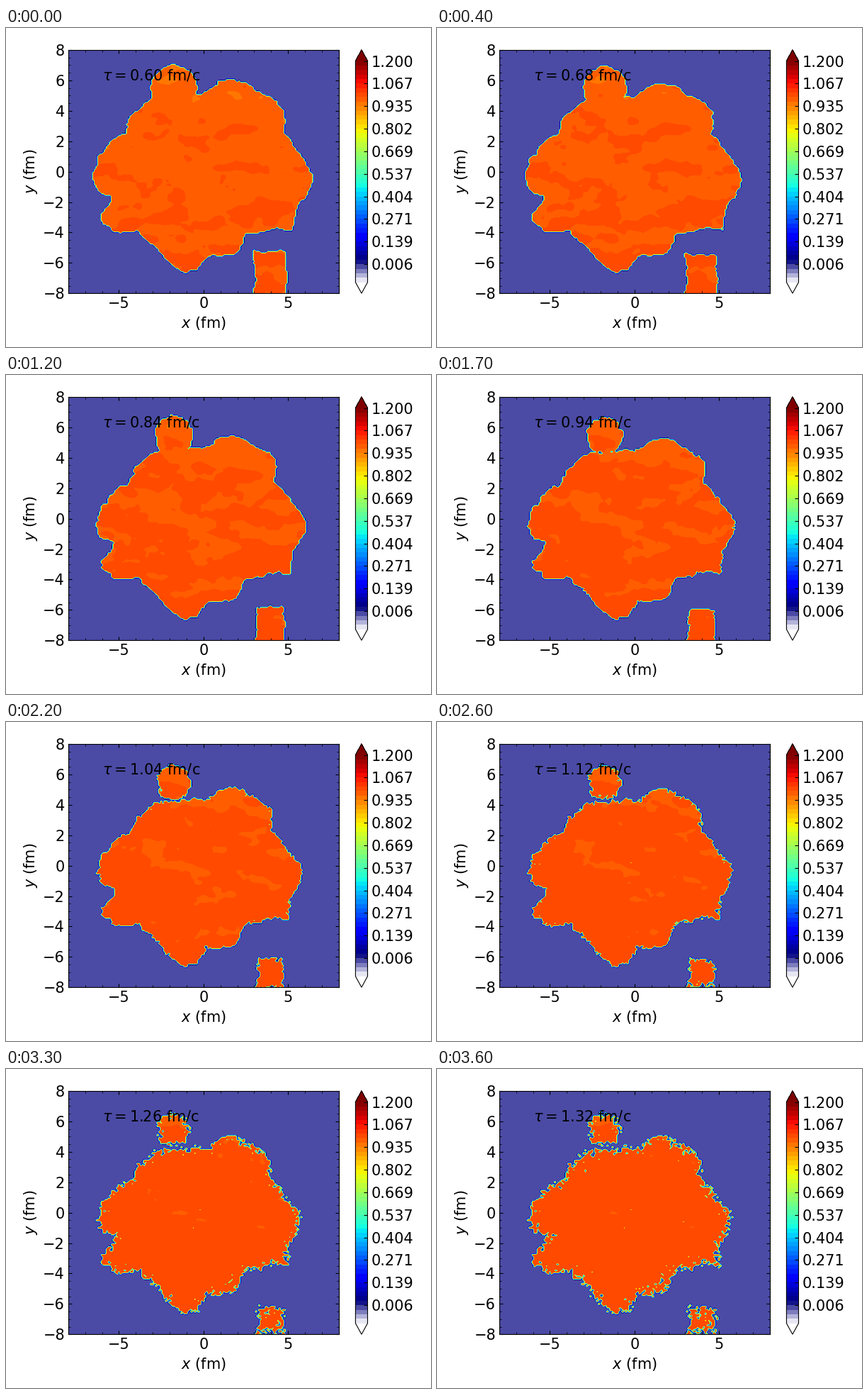
A matplotlib script that plays this animation: 600x450 px, repeating every 3700 ms.

```python
import numpy as np
import matplotlib.pyplot as plt
from matplotlib.animation import FuncAnimation
from matplotlib.colors import ListedColormap
from matplotlib.path import Path

W, H, DPI = 600, 450, 100
FRAMES, STEP = 37, 100
LEFT, RIGHT, TOP, BOTTOM = 87.8, 469.8, 30.9, 374.3
N = 161

plt.rcParams.update({
    "font.family": "DejaVu Sans", "font.size": 15,
    "xtick.direction": "in", "ytick.direction": "in",
})

# Grid nodes, also expressed in stage pixels.
axis = np.linspace(-8, 8, N)
PX, PY = np.meshgrid(LEFT + (axis + 8) / 16 * (RIGHT - LEFT),
                     BOTTOM - (axis + 8) / 16 * (BOTTOM - TOP))
GRID = np.column_stack([PX.ravel(), PY.ravel()])

# Corners of the hot region at the start, in stage pixels.
BODY = [
    (206, 100), (245, 94), (278, 93), (300, 77), (322, 73), (338, 77), (350, 87),
    (381, 102), (393, 118), (391, 146), (417, 181), (430, 203), (432, 223),
    (410, 253), (404, 286), (378, 283), (340, 291), (326, 317), (284, 322),
    (270, 341), (252, 345), (240, 339), (210, 309), (185, 286), (152, 288),
    (135, 272), (133, 262), (147, 250), (149, 237), (136, 236), (121, 213),
    (130, 185), (155, 151), (168, 148), (176, 125)]


def distance(poly):
    """Signed distance to a polygon, positive inside."""
    pts = np.array(poly, float)
    best = np.full(len(GRID), np.inf)
    for a, b in zip(pts, np.roll(pts, -1, axis=0)):
        ab, rel = b - a, GRID - a
        t = np.clip(rel @ ab / (ab @ ab), 0, 1)
        best = np.minimum(best, np.hypot(*(rel - t[:, None] * ab).T))
    sign = np.where(Path(pts).contains_points(GRID), 1, -1)
    return (sign * best).reshape(N, N)


def noise(seed, sx, sy):
    white = np.random.default_rng(seed).standard_normal((N, N))
    f = np.fft.fftfreq(N)
    blur = np.exp(-2 * np.pi ** 2 * ((f * sx) ** 2 + (f[:, None] * sy) ** 2))
    out = np.fft.ifft2(np.fft.fft2(white) * blur).real
    return out / out.std()


body = distance(BODY)
# The top and the right side lose the most ground.
erosion = np.clip(.08 * (345 - PY) + .03 * (PX - 276), 0, None)
ripple, grain = noise(3, 1.3, 1.3), np.abs(noise(8, .6, .6))
mottle = .8 * noise(5, 5, 2.6) + .3 * noise(6, 1.5, 1.2) + (PY - 210) / 140
speck = np.random.default_rng(11).random((N, N))
fragile = 1 + .5 * ((PX > 340) & (PY > 325))


def field(i):
    s = i / (FRAMES - 1)
    p = 1 - (1 - s) ** 2
    cap = 32 - 9 * p - np.hypot(PX - 237, PY - 85 - p)
    drop = np.minimum(22 - 5 * p - np.abs(PX - 373),
                      39 - 22 * p - np.abs(PY - 354))
    edge = np.maximum(np.maximum(body - p * erosion, cap), drop)
    rough = .3 + 7 * s ** 3
    inside = edge + ripple > rough * fragile * (grain - .5)

    heat = .45 * (mottle - .8 + 2.7 * s)
    value = np.clip(.9878 + .02 * heat, .938, 1.01)
    value[speck < 6e-4 * (s - .6)] = .5
    return value * inside


def rect(x0, x1):
    return [x0 / W, 1 - BOTTOM / H, (x1 - x0) / W, (BOTTOM - TOP) / H]


# White to navy over the lowest tenth, then the jet ramp.
ramp = np.linspace(0, 1, 512)
colors = plt.get_cmap("jet")(np.clip((ramp - .1) / .9, 0, 1))
low = ramp < .1
fade = ramp[low, None] / .1
colors[low, :3] = 1 - fade + fade * np.array([0, 0, .5])
cmap = ListedColormap(colors)
levels = np.linspace(-.1, 1.2, 50)

fig = plt.figure(figsize=(W / DPI, H / DPI), dpi=DPI, facecolor="white")
ax = fig.add_axes(rect(LEFT, RIGHT))
cax = fig.add_axes(rect(493.4, 510.48))


def paint(i):
    return ax.contourf(axis, axis, field(i), levels, cmap=cmap, extend="both")


bar = fig.colorbar(paint(0), cax=cax, ticks=levels[4::5], format="%.3f")
bar.ax.minorticks_off()
ax.set(xlim=(-8, 8), ylim=(-8, 8), xticks=[-5, 0, 5], yticks=range(-8, 9, 2))
ax.set_xlabel(r"$x$ (fm)")
ax.set_ylabel(r"$y$ (fm)")
ax.minorticks_on()
ax.tick_params(which="both", top=True, right=True)
label = ax.text(-6, 6, "")


def update(i):
    for old in list(ax.collections):
        old.remove()
    paint(i)
    label.set_text(rf"$\tau={.6 + .02 * i:.2f}$ fm/c")
    return []


anim = FuncAnimation(fig, update, frames=FRAMES, interval=STEP,
                     repeat=True, repeat_delay=0, blit=False)
plt.show()
```
